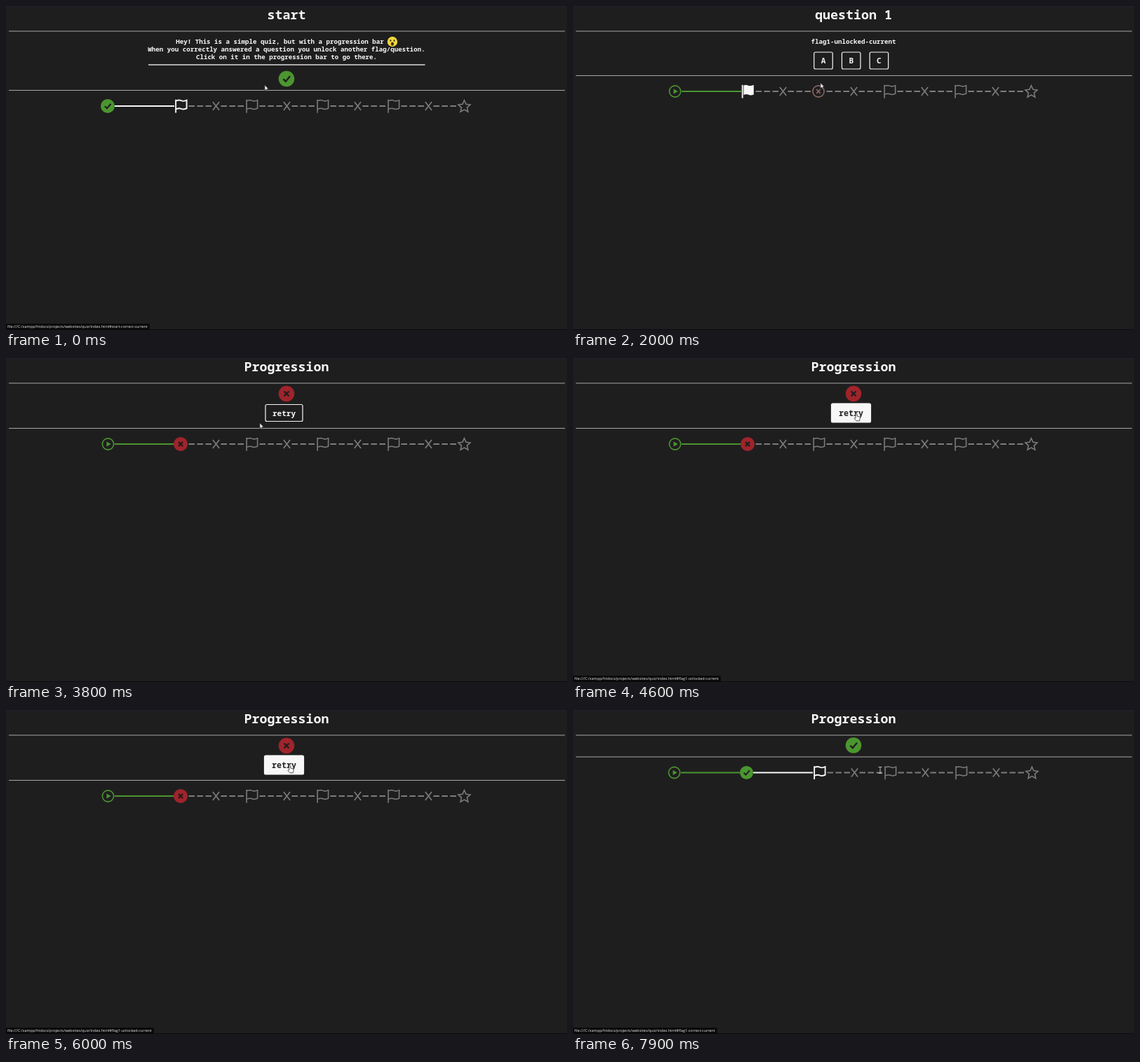
An HTML page with a canvas for the animation above (8000 ms loop, 800 by 463 pixels).

```html
<!DOCTYPE html>
<html lang="en">
<head>
<meta charset="utf-8">
<title>Quiz with a progression bar</title>
<style>
html, body { margin: 0; width: 800px; height: 463px; overflow: hidden; background: #1f1e1f; }
canvas { display: block; }
</style>
</head>
<body>
<canvas id="stage" width="800" height="463"></canvas>
<script>
const ctx = document.getElementById('stage').getContext('2d');
const LOOP = 8000;
const BG = '#1f1e1f', WHITE = '#f7f7f7', GRAY = '#7d7d7d', GREEN = '#4b9630', RED = '#a0242b', LOCKED = '#8a6763';
const MONO = '"Noto Sans Mono", "DejaVu Sans Mono", monospace';

// Paths on a 16 x 16 grid
const SHAPES = {
  pole: 'M2.5 .6V15.7',
  flag: 'M2.5 2C4 1.5 5.3 1.2 6.5 1.2C8.2 1.2 9 2.3 11 2.3C12 2.3 13.5 1.8 14.9 1.3V10.6C13.5 11.1 12 11.6 11 11.6C9 11.6 8.2 10.6 6.5 10.6C5.3 10.6 4 11 2.5 11.5',
  cloth: 'M3.9 1.1C5 .7 6 .6 7 .7C9 1 10 1.9 12 1.6C13.3 1.4 14.5 .8 15.4 .6V11.6C14 12.2 12.5 12.5 11 12.3C9 11.9 8 11.2 6.5 11.3C5.5 11.4 4.7 11.7 3.9 12Z',
  ring: 'M15.2 8A7.2 7.2 0 1 1 .8 8A7.2 7.2 0 1 1 15.2 8Z',
  disc: 'M16 8A8 8 0 1 1 0 8A8 8 0 1 1 16 8Z',
  tick: 'M4.7 8.2L7.2 10.6L11.6 5.4',
  cross: 'M5.5 5.5L10.5 10.5M10.5 5.5L5.5 10.5',
  play: 'M6.2 4.9L11.6 8L6.2 11.1Z',
  letterX: 'M4.3 3.2L11.7 12.8M11.7 3.2L4.3 12.8',
  star: 'M8 1.4L10 5.9L14.8 6.4L11.2 9.7L12.3 14.5L8 12.1L3.7 14.5L4.8 9.7L1.2 6.4L6 5.9Z'
};
const paths = Object.fromEntries(Object.entries(SHAPES).map(([k, d]) => [k, new Path2D(d)]));

const ARROW = new Path2D('M0 0V7.6L1.7 6.1L2.8 8.6L4 8.1L2.9 5.6H5.2Z');
const HAND = new Path2D('M-1 .8Q0 -.8 1 .8V4L4.6 5Q5.6 5.3 5.4 6.5L4.6 10.8H0L-2.8 7.4Q-2.9 6 -1 7Z');

// Start time and page
const PAGES = [[0, 'start'], [1200, 'question'], [3200, 'wrong'], [5300, 'question'],
  [5700, 'wrong'], [6600, 'question'], [7400, 'right']];
// Start time and link target in the status bubble
const STATUS = [[0, 'start-correct'], [700, 'flag1-unlocked'], [1500, ''], [2500, 'flag1-incorrect'],
  [3500, ''], [4400, 'flag1-unlocked'], [5300, ''], [5550, 'flag1-incorrect'],
  [5900, 'flag1-unlocked'], [6600, 'flag1-incorrect'], [7000, 'flag1-correct']];
// Pointer: time, x, y
const POINTER = [[0, 369, 113], [100, 369, 113], [800, 249, 142], [1350, 249, 142], [1950, 353, 110],
  [2050, 353, 110], [2400, 360, 79], [3400, 360, 80], [3750, 362, 93], [3850, 362, 93],
  [4300, 404, 79], [5400, 404, 79], [6300, 405, 79], [6750, 405, 79], [7000, 437, 82],
  [7500, 437, 82], [7800, 438, 86], [LOOP, 438, 86]];

const at = (list, t) => list.findLast(row => row[0] <= t)[1];

function pointerAt(t) {
  const i = POINTER.findIndex(p => p[0] > t);
  const [t0, x0, y0] = POINTER[i - 1], [t1, x1, y1] = POINTER[i];
  const u = (t - t0) / (t1 - t0), e = u * u * (3 - 2 * u);
  return { x: x0 + (x1 - x0) * e, y: y0 + (y1 - y0) * e };
}

function text(str, x, y, size, color = WHITE, weight = 600) {
  ctx.font = `${weight} ${size}px ${MONO}`;
  ctx.textAlign = 'center';
  ctx.fillStyle = color;
  ctx.fillText(str, x, y);
}

function line(x0, x1, y, color, width) {
  ctx.fillStyle = color;
  ctx.fillRect(x0, y - width / 2, x1 - x0, width);
}

const rule = y => line(4, 797, y, '#aaa79f', 1);

function title(str) {
  text(str, 400, 18.7, 18.33, WHITE, 700);
  rule(36);
}

// Each part is [shape, colour, stroke width]; no width means fill
function icon(x, y, size, ...parts) {
  ctx.save();
  ctx.translate(x - size / 2, y - size / 2);
  ctx.scale(size / 16, size / 16);
  for (const [name, color, width] of parts) {
    ctx.fillStyle = ctx.strokeStyle = color;
    ctx.lineWidth = width;
    width ? ctx.stroke(paths[name]) : ctx.fill(paths[name]);
  }
  ctx.restore();
}

const check = (x, y, size) => icon(x, y, size, ['disc', GREEN], ['tick', BG, 1.7]);
const fail = (x, y, size) => icon(x, y, size, ['disc', RED], ['cross', BG, 1.7]);
const flag = (x, y, color, w) => icon(x, y, 20, ['pole', color, w], ['flag', color, w]);
const fullFlag = (x, y, size) => icon(x - 1, y, size, ['pole', WHITE, 1.5], ['cloth', WHITE]);
const playIcon = (x, y) => icon(x, y, 18, ['ring', GREEN, 1.4], ['play', GREEN]);

function dashes(x, y) {
  for (let i = 0; i < 3; i++) line(x + i * 12, x + i * 12 + 8.5, y, GRAY, 2);
}

// Locked part of the bar, following the flag at x
function lockedTrail(x, y, flags, p) {
  for (let i = 0; i <= flags; i++, x += 101) {
    dashes(x + 11.5, y);
    icon(x + 50.5, y, 20, ['letterX', GRAY, 1.3]);
    dashes(x + 57.5, y);
    const next = x + 101;
    if (i === flags) icon(next + .5, y, 20, ['star', GRAY, 1.25]);
    else if (Math.hypot(p.x - next, p.y - y) < 13)
      icon(next, y, 18, ['ring', LOCKED, 1.4], ['cross', LOCKED, 1.5]);
    else flag(next, y, GRAY, 1.25);
  }
}

function button(label, x, y, width, p, pressed) {
  const hover = Math.abs(p.x - x) < width / 2 && Math.abs(p.y - y) < 12.5;
  const grow = hover ? (pressed ? 1 : 3) : 0;
  const w = width + grow, h = 24 + grow;
  ctx.beginPath();
  ctx.roundRect(x - w / 2, y - h / 2, w, h, 2);
  if (hover) {
    ctx.fillStyle = pressed ? '#eeeeee' : WHITE;
    ctx.fill();
  }
  ctx.strokeStyle = pressed && hover ? '#c8c8c8' : WHITE;
  ctx.lineWidth = 1.2;
  ctx.stroke();
  text(label, x, y + 4, hover ? 11.6 : 11, hover ? (pressed ? '#c9c9c9' : '#242424') : WHITE);
  return hover;
}

function face(x, y) {
  const dot = (dx, dy, rx, ry, color) => {
    ctx.beginPath();
    ctx.ellipse(x + dx, y + dy, rx, ry, 0, 0, 7);
    ctx.fillStyle = color;
    ctx.fill();
  };
  dot(0, 0, 7.2, 7.2, '#f3d63c');
  dot(-2.6, -1.6, 1, 1.4, '#3a2c18');
  dot(2.6, -1.6, 1, 1.4, '#3a2c18');
  dot(0, 3.2, 2, 2.6, '#3a2c18');
}

// Each page draws itself and tells whether the pointer is over a link
const draw = {
  start(p, t) {
    title('start');
    text('Hey! This is a simple quiz, but with a progression bar', 390.5, 54.3, 9.17);
    face(551, 51);
    text('When you correctly answered a question you unlock another flag/question.', 400, 65.3, 9.17);
    text('Click on it in the progression bar to go there.', 400, 76.3, 9.17);
    line(203, 597.5, 84, WHITE, 1.3);
    check(400, 104, 22.5);
    rule(120.5);
    check(145, 143, 20 - 2 * Math.min(1, t / 600));
    line(155, 240, 143, WHITE, 2);
    lockedTrail(249, 143, 3, p);
    const hover = Math.hypot(p.x - 249, p.y - 143) < 11;
    hover ? fullFlag(250, 143, 22) : flag(249, 143, WHITE, 1.5);
    return hover;
  },
  question(p, t) {
    title('question 1');
    text('flag1-unlocked-current', 400, 54.3, 9.17);
    const pressed = t > 6550 && t < 6750;
    const hover = ['A', 'B', 'C'].map((s, i) => button(s, 357 + i * 39.7, 78, 26.5, p, pressed));
    rule(99.5);
    playIcon(145.5, 122);
    line(155, 240, 122, GREEN, 2);
    fullFlag(249.5, 122, 20);
    lockedTrail(249, 122, 3, p);
    return hover.includes(true);
  },
  wrong(p) {
    title('Progression');
    fail(400, 51, 22.5);
    const hover = button('retry', 396.5, 78.5, 53, p, false);
    rule(100.5);
    playIcon(145.5, 123);
    line(155, 240, 123, GREEN, 2);
    fail(249, 123, 20);
    lockedTrail(249, 123, 3, p);
    return hover;
  },
  right(p) {
    title('Progression');
    check(400, 50.5, 22.5);
    rule(67);
    playIcon(144.5, 89.5);
    line(154, 239, 89.5, GREEN, 2);
    check(247.5, 89.5, 19);
    line(257, 342, 89.5, WHITE, 2);
    flag(351, 89.5, WHITE, 1.5);
    lockedTrail(351, 89.5, 2, p);
    return false;
  }
};

function statusBubble(target) {
  if (!target) return;
  const url = `file:///C:/xampp/htdocs/projects/websites/quiz/index.html#${target}-current`;
  ctx.font = '5.4px "Open Sans", "Noto Sans", sans-serif';
  ctx.textAlign = 'left';
  ctx.fillStyle = '#09090a';
  ctx.fillRect(0, 454, ctx.measureText(url).width + 5, 9);
  ctx.fillStyle = '#e8e8e8';
  ctx.fillText(url, 2, 460);
}

function pointer({ x, y }, kind) {
  ctx.save();
  ctx.translate(x, y);
  ctx.lineWidth = .9;
  if (kind === 'beam') {
    ctx.strokeStyle = '#c9c9c9';
    ctx.stroke(new Path2D('M-2.5 -4.5H2.5M0 -4.5V4.5M-2.5 4.5H2.5'));
  } else {
    const shape = kind === 'hand' ? HAND : ARROW;
    ctx.fillStyle = '#fff';
    ctx.strokeStyle = '#444';
    ctx.fill(shape);
    ctx.stroke(shape);
  }
  ctx.restore();
}

function frame(now) {
  const t = now % LOOP, page = at(PAGES, t), p = pointerAt(t);
  ctx.fillStyle = BG;
  ctx.fillRect(0, 0, 800, 463);
  line(0, 800, .5, '#1c2233', 1);
  line(0, 800, 462.5, '#0b0b0f', 1);
  const hover = draw[page](p, t);
  statusBubble(at(STATUS, t));
  pointer(p, page === 'right' ? 'beam' : hover ? 'hand' : 'arrow');
  requestAnimationFrame(frame);
}
requestAnimationFrame(frame);
</script>
</body>
</html>
```
